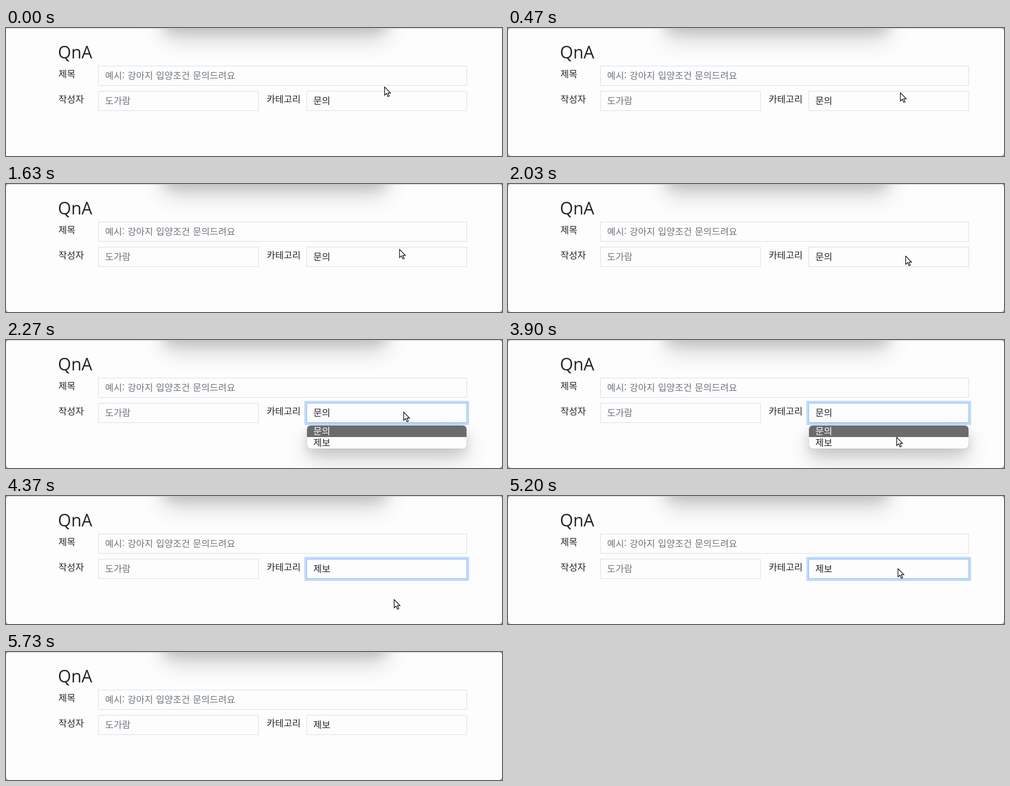
An HTML page that plays this animation: 936 px wide and 244 px high, repeating every 5860 ms.

```html
<!DOCTYPE html>
<html lang="ko">
<head>
<meta charset="utf-8">
<title>QnA</title>
<style>
  :root { --paper: #fdfdfd; --ink: #212529; --row: #6b6b6d; --loop: 5860ms; }
  html, body { margin: 0; width: 100%; height: 100%; overflow: hidden; background: #a4a4a4; }
  body * { position: absolute; box-sizing: border-box; }

  .window {
    left: 0; top: 0; width: 936px; height: 244px; overflow: hidden;
    background: var(--paper); color: var(--ink);
    font: 300 17.4px/20px "Noto Sans CJK KR", "Noto Sans CJK", sans-serif;
    word-spacing: .7px; white-space: nowrap;
    animation: corners var(--loop) step-end infinite;
  }
  .edge { left: 0; top: 0; width: 936px; height: 1px; background: #c6c6c6; }
  h1 { left: 98px; top: 26px; margin: 0; font: 400 32px/40px "Open Sans", "Noto Sans", sans-serif; }

  .floating {
    box-shadow: 0 0 1px rgba(0, 0, 0, .5),
                0 8px 22px rgba(0, 0, 0, .13),
                0 22px 44px rgba(0, 0, 0, .17);
  }
  .above { left: 298px; top: -60px; width: 420px; height: 60px; border-radius: 8px; background: #c4c4c6; }

  .field { height: 38px; border: 1px solid #dadde4; }
  .field span { left: 12px; top: 7px; }
  .hint { color: #6c757d; }
  .ring {
    left: 567px; top: 120px; width: 303px; height: 38px;
    border: 1px solid #86b7fe; box-shadow: 0 0 0 4px #c2dbfe;
    animation: ring var(--loop) linear infinite;
  }

  .menu {
    left: 568px; top: 163px; width: 301px; height: 44px;
    border-radius: 7px; background: var(--paper);
    animation: menu var(--loop) step-end infinite;
  }
  .menu div { left: 0; width: 301px; height: 22px; padding-left: 12px; }
  .first { top: 0; border-radius: 7px 7px 0 0; animation: first var(--loop) step-end infinite; }
  .second { top: 22px; border-radius: 0 0 7px 7px; animation: second var(--loop) step-end infinite; }

  .before { animation: before var(--loop) step-end infinite; }
  .after { animation: after var(--loop) step-end infinite; }

  .cursor { left: 0; top: 0; width: 14px; height: 21px; overflow: visible; animation: move var(--loop) linear infinite; }
  .cursor path { fill: #fff; stroke: #000; stroke-width: 1.2; }

  @keyframes corners { 0% { border-radius: 0 } .51%, 100% { border-radius: 6px } }
  @keyframes ring {
    0%, 34.3% { opacity: 0; animation-timing-function: ease-in-out }
    37.2%, 97.77% { opacity: 1 }
    97.78%, 100% { opacity: 0 }
  }
  @keyframes menu {
    0% { visibility: hidden }
    35.3% { visibility: visible }
    74.57%, 100% { visibility: hidden }
  }
  @keyframes first {
    0% { background: var(--row); color: #fff }
    67.06%, 100% { background: none; color: var(--ink) }
  }
  @keyframes second {
    0% { background: none; color: var(--ink) }
    67.06%, 100% { background: var(--row); color: #fff }
  }
  @keyframes before { 0% { visibility: visible } 74.57%, 100% { visibility: hidden } }
  @keyframes after { 0% { visibility: hidden } 74.57%, 100% { visibility: visible } }
  @keyframes move {
    0%, .4% { transform: translate(714px, 112px); animation-timing-function: ease-out }
    8%, 27.3% { transform: translate(740px, 123px) }
    27.81% { transform: translate(742px, 124px); animation-timing-function: ease-out }
    30.7%, 60.4% { transform: translate(750px, 137px); animation-timing-function: ease-in-out }
    66.55% { transform: translate(733px, 185px); animation-timing-function: ease-out }
    70.4%, 85.3% { transform: translate(732px, 197px); animation-timing-function: ease-in-out }
    95%, 100% { transform: translate(745px, -26px) }
  }
</style>
</head>
<body>
  <div class="window">
    <div class="above floating"></div>
    <div class="edge"></div>
    <h1>QnA</h1>

    <span style="left:99px; top:77px">제목</span>
    <div class="field" style="left:174px; top:72px; width:696px">
      <span class="hint">예시: 강아지 입양조건 문의드려요</span>
    </div>

    <span style="left:99px; top:125px">작성자</span>
    <div class="field" style="left:174px; top:120px; width:303px">
      <span class="hint">도가람</span>
    </div>

    <span style="left:492px; top:125px">카테고리</span>
    <div class="field" style="left:567px; top:120px; width:303px">
      <span class="before">문의</span>
      <span class="after">제보</span>
    </div>
    <div class="ring"></div>

    <div class="menu floating">
      <div class="first">문의</div>
      <div class="second">제보</div>
    </div>

    <svg class="cursor" viewBox="0 0 14 21">
      <path d="M.5 .5V16.2L4.2 12.8L6.8 18.8L9.3 17.7L6.8 11.9H11.6Z"/>
    </svg>
  </div>
</body>
</html>
```
